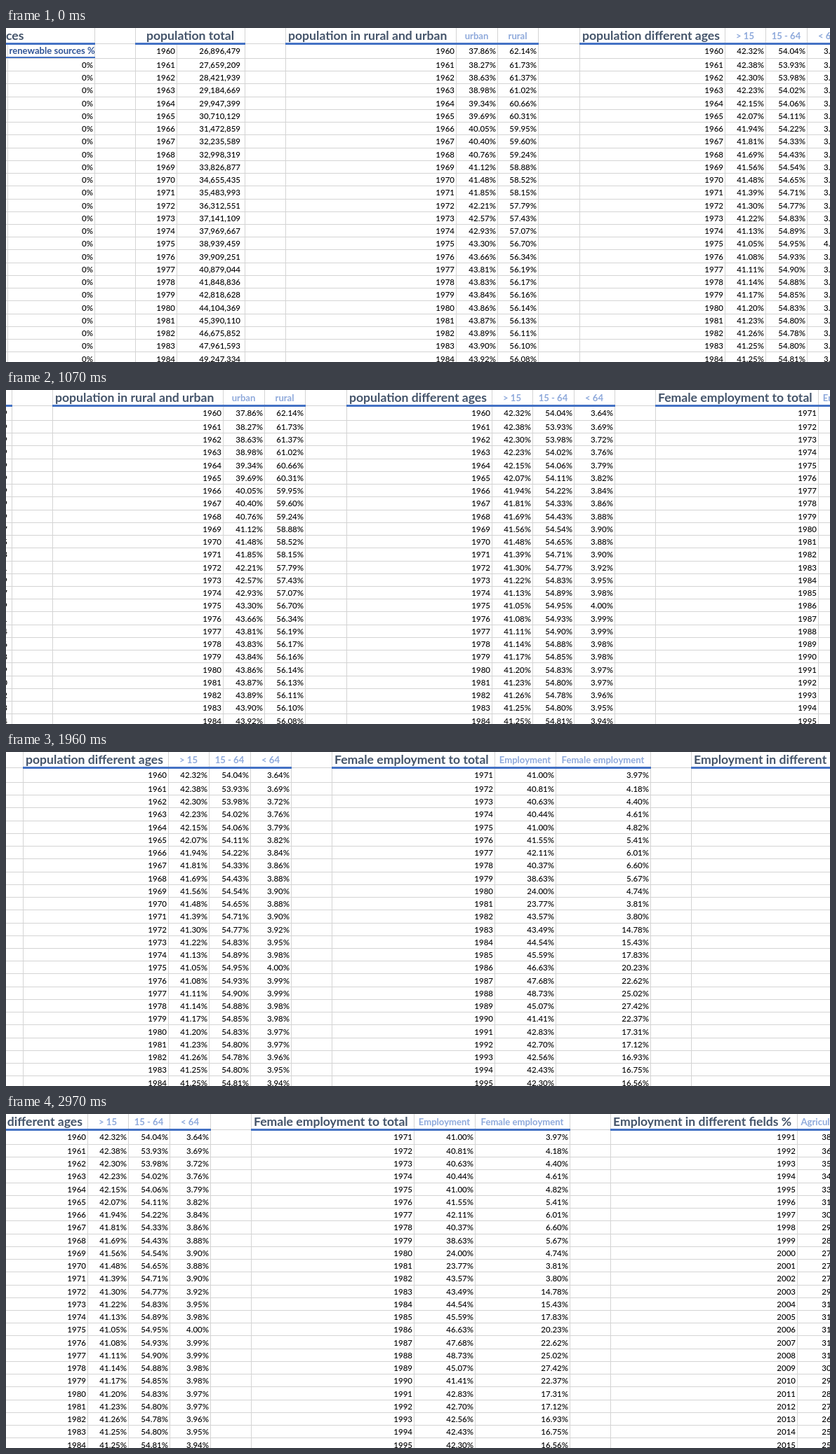
Animation of 1174 by 477 pixels, one loop 4280 ms. Source, as an HTML page with a canvas:

```html
<!DOCTYPE html>
<html lang="en">
<head>
<meta charset="utf-8">
<title>Population and employment sheet</title>
<style>
html, body { margin: 0; width: 100%; height: 100%; overflow: hidden; background: #fff; }
canvas { display: block; }
</style>
</head>
<body>
<canvas id="sheet" width="1174" height="477"></canvas>
<script>
const ctx = document.getElementById('sheet').getContext('2d');
const WIDTH = 1174, HEIGHT = 477, ROWS = 25, ROW_HEIGHT = 18.24, LOOP = 4280;
const GRID = '#d4d4d4', BLUE = '#4472c4', LIGHT = '#8ea9db', DARK = '#44546a';
const CELL = '500 11.5px Lato, sans-serif';
const TITLE = 'bold 17.6px Lato, sans-serif';
const LABEL = 'bold 13.1px Lato, sans-serif';

// Linear interpolation through a few [position, value] points
function along(points, at) {
  const next = Math.max(1, points.findIndex(p => p[0] >= at));
  const [a, from] = points[next - 1], [b, to] = points[next];
  return from + (to - from) * (at - a) / (b - a);
}

const column = valueAt => Array.from({ length: ROWS }, (_, row) => valueAt(row));
const years = first => column(row => first + row);
const percent = value => value.toFixed(2) + '%';
const trend = (...points) => column(row => along(points, row));

const total = trend([0, 26896479], [8, 32998319], [14, 37969667], [19, 42818628], [24, 49247334]);
const urban = trend([0, 37.86], [1, 38.27], [8, 40.76], [16, 43.66], [17, 43.81], [24, 43.92]);
const young = trend([0, 42.32], [1, 42.38], [5, 42.07], [9, 41.56], [15, 41.05], [22, 41.26], [24, 41.25]);
const adult = trend([0, 54.04], [1, 53.93], [5, 54.11], [10, 54.65], [15, 54.95], [22, 54.78], [24, 54.81]);
const employed = trend([0, 41], [3, 40.44], [6, 42.11], [8, 38.63], [9, 24], [10, 23.77],
  [11, 43.57], [12, 43.49], [17, 48.73], [19, 41.41], [20, 42.83], [24, 42.3]);
const women = trend([0, 3.97], [4, 4.82], [7, 6.6], [10, 3.81], [11, 3.8], [12, 14.78],
  [13, 15.43], [18, 27.42], [20, 17.31], [24, 16.56]);
const farming = trend([0, 38], [8, 28], [11, 27], [13, 31], [17, 31], [24, 25]);

// Each column: [width, values, label]
const tables = [
  { title: 'ces', left: -60, indent: 60, columns: [
    [62, []],
    [124, column(row => row ? '0%' : '')]] },
  { title: 'population total', left: 184, indent: 16, columns: [
    [59, years(1960)],
    [97, total.map(v => Math.round(v).toLocaleString('en-US')), '', 6]] },
  { title: 'population in rural and urban', left: 398, columns: [
    [243, years(1960)],
    [59, urban.map(percent), 'urban'],
    [58, urban.map(v => percent(100 - v)), 'rural']] },
  { title: 'population different ages', left: 817, columns: [
    [207, years(1960)],
    [58, young.map(percent), '> 15'],
    [59, adult.map(percent), '15 - 64'],
    [58, young.map((v, row) => percent(100 - v - adult[row])), '< 64']] },
  { title: 'Female employment to total', left: 1257, columns: [
    [232, years(1971)],
    [87, employed.map(percent), 'Employment'],
    [135, women.map(percent), 'Female employment']] },
  { title: 'Employment in different fields %', left: 1769, columns: [
    [266, years(1991)],
    [76, farming.map(percent), 'Agriculture']] }
];

// Swipes with pauses; the view refreshes every 60 ms from each anchor
const anchors = [0, 50, 1420, 2010, 2440, 2790];
const swipes = [
  [0, 0], [50, 3], [290, 75], [590, 250], [710, 280], [770, 280], [1070, 332], [1540, 505],
  [1600, 526], [1660, 526], [1960, 793], [2130, 868], [2430, 868], [2440, 875], [2970, 908], [LOOP, 908]
];

function scrollAt(time) {
  const anchor = anchors.findLast(a => a <= time);
  const refresh = anchor + Math.floor((time - anchor) / 60) * 60;
  return Math.round(along(swipes, refresh));
}

function rect(color, x, y, w, h) {
  ctx.fillStyle = color;
  ctx.fillRect(x, y, w, h);
}

function write(text, x, y, font, color, align = 'left') {
  ctx.font = font;
  ctx.fillStyle = color;
  ctx.textAlign = align;
  ctx.fillText(text, x, y);
}

const rowTop = row => row ? Math.floor(43.4 + (row - 1) * ROW_HEIGHT) : 23;
const baseline = row => row ? Math.round(57 + (row - 1) * ROW_HEIGHT) : 37;

function drawTable({ title, left, indent = 4, columns }) {
  const hasLabels = columns.some(([, , label]) => label);
  let right = left;
  rect(GRID, left, 0, 1, HEIGHT);
  columns.forEach(([width, values, label = '', padding = 2], i) => {
    const center = right + width / 2;
    right += width;
    const merged = !hasLabels && i < columns.length - 1;
    rect(GRID, right, merged ? 23 : 0, 1, HEIGHT);
    write(label, center, 16, LABEL, LIGHT, 'center');
    values.forEach((value, row) => write(value, right - padding, baseline(row), CELL, '#000', 'right'));
  });
  rect(BLUE, left, 21, right + 1 - left, 3);
  write(title, left + indent, 16.5, TITLE, DARK);
}

function draw(scroll) {
  rect('#fff', 0, 0, WIDTH, HEIGHT);
  rect(GRID, 0, 22, WIDTH, 1);
  for (let row = 1; row <= ROWS; row++) rect(GRID, 0, rowTop(row), WIDTH, 1);

  ctx.save();
  ctx.translate(-scroll, 0);
  tables.forEach(drawTable);
  rect(BLUE, 0, 41, 127, 2);
  write('renewable sources %', 4.5, 37, LABEL, '#305496');
  ctx.restore();
}

let shown = -1;
function tick() {
  const scroll = scrollAt(performance.now() % LOOP);
  if (scroll !== shown) draw(shown = scroll);
  requestAnimationFrame(tick);
}
tick();
</script>
</body>
</html>
```
